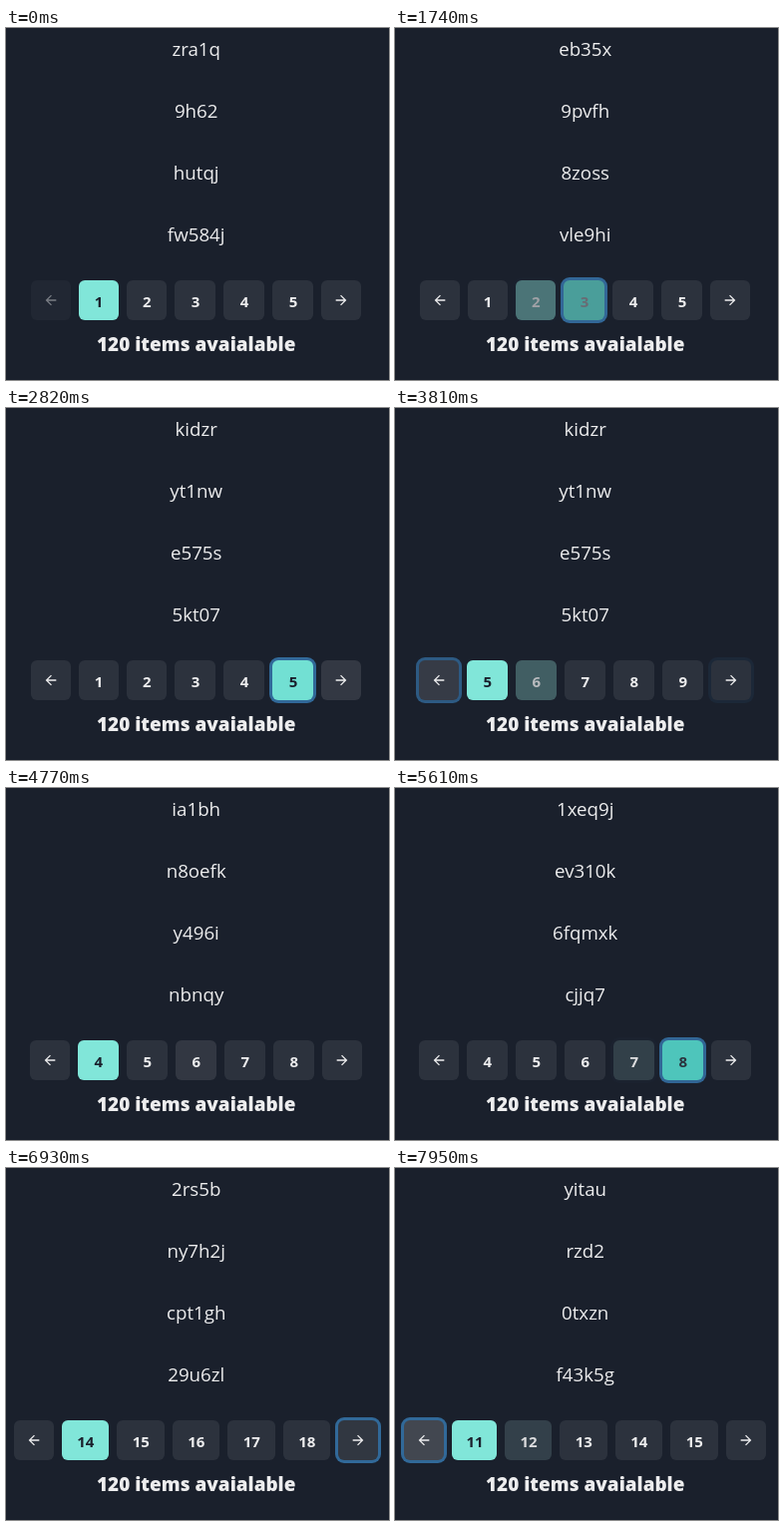
Write an HTML page with a canvas that moves like this. It is 384 by 353 pixels and loops after 8 s.

```html
<!DOCTYPE html>
<html lang="en">
<head>
<meta charset="utf-8">
<title>Pagination</title>
<style>
  html, body { margin: 0; width: 100%; height: 100%; overflow: hidden; background: #1a202c; }
  canvas { display: block; }
</style>
</head>
<body>
<canvas width="384" height="353"></canvas>
<script>
const ctx = document.querySelector("canvas").getContext("2d");
const LOOP = 8000, FADE = 200, CENTER = 190.7, GAP = 8, TOP = 253, SIZE = 40;
const FONT = '"Open Sans", "Noto Sans", sans-serif';
const DARK = [26, 32, 44], LIGHT = [237, 237, 238];
const TEAL = [129, 230, 217], TEAL_HOVER = [79, 209, 197];

const items = {
  1: "zra1q 9h62 hutqj fw584j", 2: "k7d3m p0xwe 4tnbz uq19s",
  3: "eb35x 9pvfh 8zoss vle9hi", 4: "ia1bh n8oefk y496i nbnqy",
  5: "kidzr yt1nw e575s 5kt07", 6: "m2gxa r84ho dz6tk 0wqpe",
  7: "h5c1y x9nuf 3vkob tj72r", 8: "1xeq9j ev310k 6fqmxk cjjq7",
  9: "o6wsd 2bhy8 zk4pn g1rvt", 10: "q83ue a5mcx l0ytf 7dnhs",
  11: "yitau rzd2 0txzn f43k5g", 12: "v7p4e ns0kd 8ubhq w2xfy",
  13: "c9orm 5ytga j1zek hx60p", 14: "2rs5b ny7h2j cpt1gh 29u6zl"
};

// Pointer script: time, then what changes
const events = [];
const hover = (time, key) => events.push([time, { hover: key }]);
const press = (time, key) => events.push([time, { focus: key, press: key }]);
const click = (down, up, key) => {
  press(down, key);
  events.push([up, { press: null, go: key }]);
};
hover(900, 2);       click(1170, 1200, 2);
hover(1440, 3);      click(1520, 1668, 3);
hover(1920, 4);      click(2000, 2075, 4);
hover(2340, 5);      click(2410, 2490, 5);
hover(2738, "next"); click(3000, 3080, "next");
hover(3140, null);   hover(3240, 6); hover(3320, null);
hover(3500, "prev"); click(3690, 3720, "prev"); click(4260, 4320, "prev");
hover(4480, null);   events.push([4500, { focus: null }]);
hover(4700, 6);      hover(4920, 7); click(5070, 5130, 7);
hover(5360, 8);      click(5400, 5480, 8);
hover(5660, "next"); click(5860, 5940, "next");
click(6060, 6110, "next"); click(6210, 6260, "next"); click(6350, 6390, "next");
click(6480, 6520, "next"); click(6760, 6810, "next");
hover(6860, null);   hover(7330, "prev");
click(7440, 7500, "prev"); click(7610, 7660, "prev"); click(7770, 7820, "prev");
press(7850, "prev");

const states = [{ time: 0, page: 1, first: 1, hover: null, focus: null, press: null }];
for (const [time, { go, ...change }] of events.sort((a, b) => a[0] - b[0])) {
  const state = { ...states.at(-1), ...change, time };
  if (go) state.page = go === "prev" ? state.page - 1 : go === "next" ? state.page + 1 : go;
  if (state.page < state.first || state.page > state.first + 4) state.first = state.page;
  states.push(state);
}

const mix = (a, b, k) => a.map((v, i) => v + (b[i] - v) * k);
const rgb = c => `rgb(${c.map(Math.round)})`;

// CSS "ease": cubic-bezier(.25, .1, .25, 1)
function ease(x) {
  if (x >= 1) return 1;
  const curve = (p, q, u) => 3 * p * u * (1 - u) ** 2 + 3 * q * u * u * (1 - u) + u ** 3;
  let low = 0, high = 1;
  for (let i = 0; i < 16; i++) {
    const mid = (low + high) / 2;
    if (curve(.25, .25, mid) < x) low = mid; else high = mid;
  }
  return curve(.1, 1, low);
}

// Settled look of a button: background, text colour, ring opacity
function look(key, s) {
  const hovered = s.hover === key, ring = s.focus === key ? 1 : 0;
  if (key === s.page) return [...(hovered ? TEAL_HOVER : TEAL), ...DARK, ring];
  const alpha = !hovered ? .08 : s.press === key ? .18 : .12;
  const fill = mix(DARK, [255, 255, 255], alpha);
  const opacity = key === "prev" && s.page === 1 ? .4 : 1;
  return [...mix(DARK, fill, opacity), ...mix(fill, LIGHT, opacity), ring];
}

function styleAt(key, t) {
  let from, to = null, start;
  for (const s of states) {
    if (s.time > t) break;
    if (key < s.first || key > s.first + 4) { to = null; continue; }
    const target = look(key, s);
    if (!to) from = target;
    else if (String(to) === String(target)) continue;
    else from = mix(from, to, ease((s.time - start) / FADE));
    to = target;
    start = s.time;
  }
  return mix(from, to, ease((t - start) / FADE));
}

function widthOf(key) {
  if (typeof key === "string") return SIZE;
  const text = [...String(key)].reduce((sum, d) => sum + ({ 1: 6.5, 2: 8.5 }[d] || 9), 0);
  return Math.max(SIZE, 32 + text);
}

function label(text, x, y, font, color) {
  ctx.font = `${font} ${FONT}`;
  ctx.fillStyle = color;
  ctx.fillText(text, x, y);
}

function box(x, y, w, h, r, color) {
  ctx.fillStyle = color;
  ctx.beginPath();
  ctx.roundRect(x, y, w, h, r);
  ctx.fill();
}

const arrowPath = new Path2D("M20 11H7.83l5.59-5.59L12 4l-8 8 8 8 1.41-1.41L7.83 13H20z");
function arrow(x, y, direction, color) {
  ctx.save();
  ctx.translate(x, y);
  ctx.scale(direction * 2 / 3, 2 / 3);
  ctx.translate(-12, -12);
  ctx.fillStyle = color;
  ctx.fill(arrowPath);
  ctx.restore();
}

function button(key, x, w, t) {
  const style = styleAt(key, t), color = rgb(style.slice(3, 6));
  const left = Math.round(x), width = Math.round(x + w) - left, middle = x + w / 2;
  if (style[6] > 0)
    box(left - 3, TOP - 3, width + 6, SIZE + 6, 9, `rgba(66, 153, 225, ${.6 * style[6]})`);
  box(left, TOP, width, SIZE, 6, rgb(style.slice(0, 3)));
  if (typeof key === "string") arrow(left + width / 2, TOP + 20, key === "prev" ? 1 : -1, color);
  else label(key, middle, 279.5, "700 15px", color);
}

function draw() {
  const t = performance.now() % LOOP;
  const state = states.findLast(s => s.time <= t);
  ctx.fillStyle = rgb(DARK);
  ctx.fillRect(0, 0, 384, 353);
  ctx.textAlign = "center";
  items[state.page].split(" ").forEach((word, i) =>
    label(word, CENTER, 28 + 62 * i, "500 18.7px", rgb(LIGHT)));

  const keys = ["prev", ...[0, 1, 2, 3, 4].map(i => state.first + i), "next"];
  const total = keys.reduce((sum, key) => sum + widthOf(key) + GAP, -GAP);
  let x = CENTER - total / 2;
  for (const key of keys) {
    const w = widthOf(key);
    button(key, x, w, t);
    x += w + GAP;
  }
  label("120 items avaialable", CENTER, 324, "800 18.9px", rgb(LIGHT));
  requestAnimationFrame(draw);
}
draw();
</script>
</body>
</html>
```
